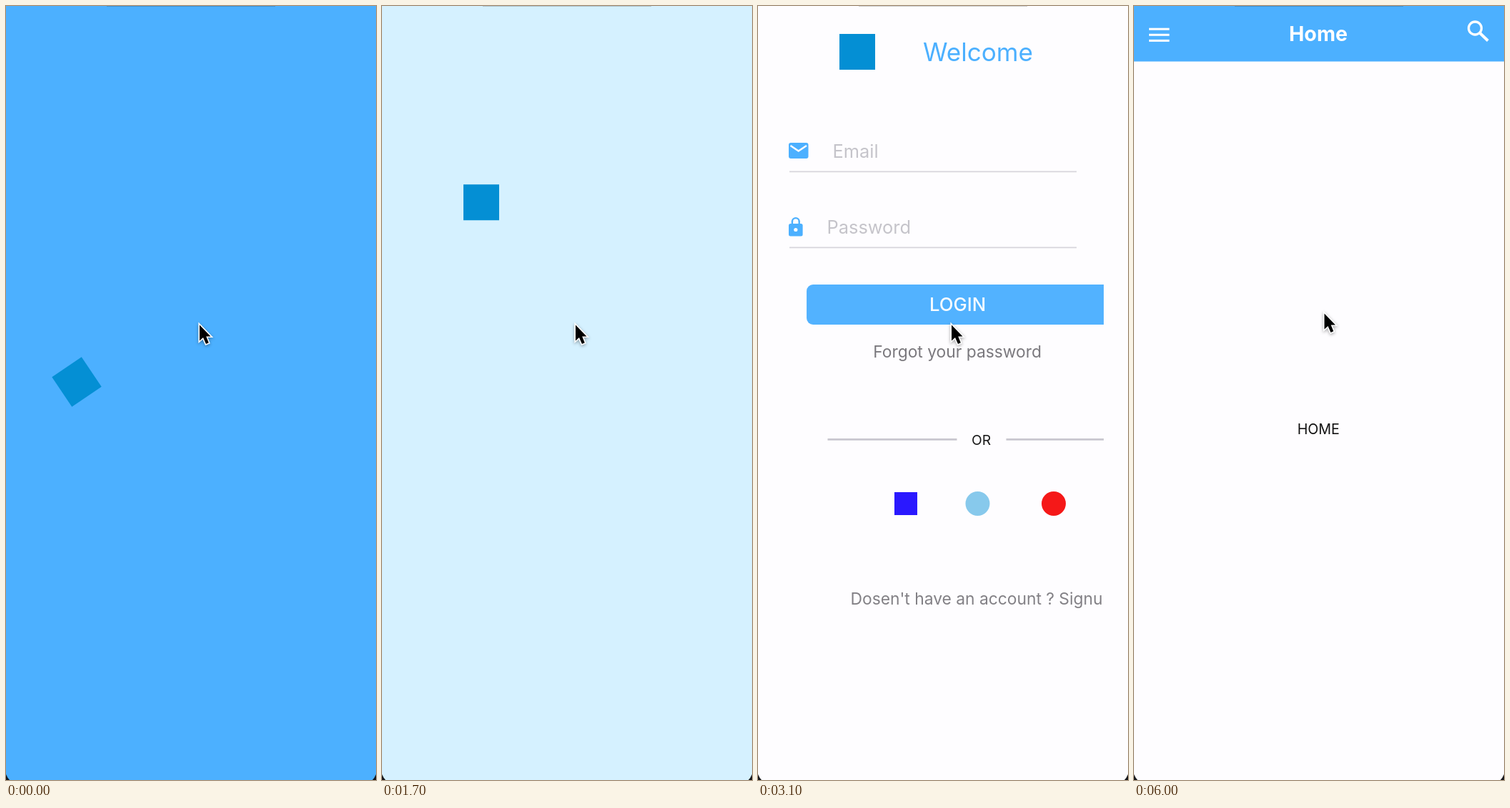
An HTML page with a canvas for the animation above (6300 ms loop, 518 by 1081 pixels).

```html
<!DOCTYPE html>
<html lang="en">
<head>
<meta charset="utf-8">
<title>Login flow</title>
<style>
  html, body { margin: 0; width: 100%; height: 100%; overflow: hidden; background: #fefdff; }
  canvas { display: block; width: 518px; height: 1081px; }
</style>
</head>
<body>
<canvas id="stage"></canvas>
<script>
const W = 518, H = 1081, LOOP = 6300, STEP = 100;
const BLUE = '#4cb0ff', WHITE = '#fefdff', LOGO = '#048fd4';
const canvas = document.getElementById('stage');
const ctx = canvas.getContext('2d');
const dpr = window.devicePixelRatio || 1;
canvas.width = W * dpr;
canvas.height = H * dpr;

const lerp = (a, b, p) => a + (b - a) * p;

// Cubic-bezier(.25, .1, .25, 1), solved by bisection.
function ease(x) {
  if (x <= 0) return 0;
  if (x >= 1) return 1;
  let lo = 0, hi = 1;
  for (let i = 0; i < 20; i++) {
    const s = (lo + hi) / 2;
    if (.75 * s * (1 - s) + s ** 3 < x) lo = s; else hi = s;
  }
  return .3 * lo * (1 - lo) ** 2 + 3 * lo * lo * (1 - lo) + lo ** 3;
}
const progress = (t, start, duration) => ease((t - start) / duration);
const smooth = p => p * p * (3 - 2 * p);

// Values of a track of [time, ...values] keys at time t.
function sample(track, t, easing = p => p) {
  let i = 0;
  while (i < track.length - 2 && t >= track[i + 1][0]) i++;
  const [a, b] = [track[i], track[i + 1]];
  const p = Math.max(0, Math.min(1, (t - a[0]) / (b[0] - a[0])));
  return a.map((v, k) => lerp(v, b[k], easing(p))).slice(1);
}

function text(str, x, y, size, color, { weight = 400, align = 'left' } = {}) {
  ctx.font = `${weight} ${size}px Inter, sans-serif`;
  ctx.textAlign = align;
  ctx.fillStyle = color;
  ctx.fillText(str, x, y);
}

function box(x, y, w, h, color, r = 0) {
  ctx.fillStyle = color;
  ctx.beginPath();
  ctx.roundRect(x, y, w, h, r);
  ctx.fill();
}

function disc(x, y, r, color) {
  ctx.fillStyle = color;
  ctx.beginPath();
  ctx.arc(x, y, r, 0, 2 * Math.PI);
  ctx.fill();
}

function polyline(points, color, width) {
  ctx.strokeStyle = color;
  ctx.lineWidth = width;
  ctx.beginPath();
  points.forEach(([x, y]) => ctx.lineTo(x, y));
  ctx.stroke();
}

function ring(x, y, r, color, width, from = 0, to = 2 * Math.PI) {
  ctx.strokeStyle = color;
  ctx.lineWidth = width;
  ctx.beginPath();
  ctx.arc(x, y, r, from, to);
  ctx.stroke();
}

function shifted(dx, alpha, draw) {
  ctx.save();
  ctx.translate(dx, 0);
  ctx.globalAlpha *= alpha;
  draw();
  ctx.restore();
}

// Background: time, red, green, blue.
const BACKDROP = [[1500, 76, 176, 255], [1700, 213, 241, 255], [1900, 254, 253, 255]];

// Rolling path of the logo: time, x, y, degrees.
const ROLL = [
  [0, 99, 525, 146], [500, 376, 500, 360], [700, 376, 500, 360],
  [1400, 105, 526, 125], [1500, 117, 528, 83], [1700, 139, 528, 0]
];

function logo(t) {
  const [x, y, angle] = sample(ROLL, t, smooth);
  ctx.save();
  ctx.translate(x, lerp(y, 64, progress(t, 1500, 630)));
  ctx.rotate(angle * Math.PI / 180);
  box(-25, -25, 50, 50, LOGO);
  ctx.restore();
}

function emailField() {
  box(43, 191, 27.5, 22, BLUE, 3);
  polyline([[45.5, 195], [56.7, 202.5], [68, 195]], WHITE, 2.5);
  text('Email', 104.5, 212, 25.4, '#c5c4ca');
  box(44, 230.5, 402, 1.7, '#d7d5dc');
}

function passwordField() {
  box(43, 304, 19.6, 17.6, BLUE, 2.5);
  ring(52.8, 301, 4.9, BLUE, 2.4, Math.PI, 0);
  box(46.7, 300.5, 2.4, 4, BLUE);
  box(56.5, 300.5, 2.4, 4, BLUE);
  disc(52.8, 312.5, 2.6, WHITE);
  text('Password', 96.5, 318, 25.4, '#c5c4ca');
  box(44, 336.5, 402, 1.7, '#d7d5dc');
}

function loginButton() {
  box(47, 389, 423.5, 56, BLUE, 9);
  text('LOGIN', 258.5, 426, 25.7, '#fff', { weight: 500, align: 'center' });
  text('Forgot your password', 258, 491, 22.8, '#757378', { align: 'center' });
}

function alternatives() {
  box(43, 604, 181, 2.8, '#c4c2ca');
  box(293, 604, 181, 2.8, '#c4c2ca');
  text('OR', 258, 612.5, 19.3, '#000', { align: 'center' });
  box(136.5, 679, 32, 32, '#1400ff');
  disc(253, 695, 17, '#7bc4ea');
  disc(359.5, 695, 17, '#f40000');
  text("Dosen't have an account ? Signup", 258.5, 835.5, 22.8, '#757378', { align: 'center' });
}

const FORM = [[emailField, 800], [passwordField, 970], [loginButton, 1500], [alternatives, 1800]];

function loginScreen(t) {
  box(0, 0, W, H, `rgb(${sample(BACKDROP, t).map(Math.round)})`);
  logo(t);

  shifted(0, progress(t, 1960, 400), () => text('Welcome', 231, 77, 35.1, BLUE));
  ctx.save();
  ctx.beginPath();
  ctx.rect(0, 0, 484, H);
  ctx.clip();
  for (const [draw, duration] of FORM) {
    const p = progress(t, 1960, duration);
    if (p > 0) shifted(582 * (1 - p), p, draw);
  }
  ctx.restore();
}

function menuIcon() {
  for (const y of [30.7, 38.8, 46.9]) box(21, y, 28.5, 3, '#fff');
}

function searchIcon() {
  ring(477.5, 31, 9, '#fff', 3.3);
  polyline([[484, 37.5], [495.5, 48.5]], '#fff', 4);
}

function homeScreen(t) {
  box(0, 0, W, H, WHITE);
  box(0, 0, W, 77.5, BLUE);
  text('HOME', 258.3, 598, 19.7, '#111', { align: 'center' });
  const p = progress(t, 5000, 1000);
  shifted(-150 * (1 - p), p, menuIcon);
  shifted(150 * (1 - p), p, searchIcon);
  shifted(0, p, () => text('Home', 258, 49, 28.6, '#fff', { weight: 700, align: 'center' }));
}

function cursor(t) {
  const p = progress(t, 3600, 500);
  ctx.save();
  ctx.translate(lerp(271, 266.5, p), lerp(445.5, 429.5, p));
  const arrow = new Path2D('M0 0V22L5 17.5L9 26.5L12.8 24.8L9.2 16H15.5Z');
  ctx.strokeStyle = '#fff';
  ctx.lineWidth = 3.2;
  ctx.shadowColor = 'rgba(0,0,0,.35)';
  ctx.shadowBlur = 4 * dpr;
  ctx.shadowOffsetY = 1.5 * dpr;
  ctx.stroke(arrow);
  ctx.shadowColor = 'transparent';
  ctx.fillStyle = '#000';
  ctx.fill(arrow);
  ctx.restore();
}

function deviceEdges() {
  box(141, 0, 236, 1, 'rgba(0,0,0,.18)');
  ctx.fillStyle = '#15161a';
  ctx.fill(new Path2D('M0 1073Q2 1078 5 1081H0ZM518 1073Q516 1078 513 1081H518Z'));
}

function render(t) {
  ctx.setTransform(dpr, 0, 0, dpr, 0, 0);
  const push = progress(t, 4300, 650);
  if (push < 1) shifted(-.3 * W * push, 1, () => loginScreen(t));
  if (push > 0) shifted(W * (1 - push), 1, () => homeScreen(t));
  deviceEdges();
  cursor(t);
}

const start = performance.now();
function tick() {
  const t = (performance.now() - start) % LOOP;
  render(Math.floor(t / STEP) * STEP);
  requestAnimationFrame(tick);
}
tick();
</script>
</body>
</html>
```
